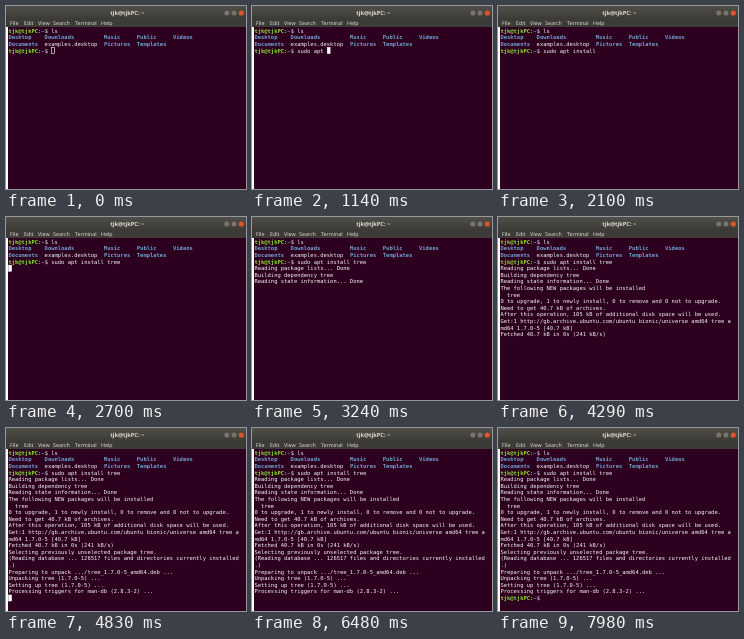
An HTML page for the animation above (8 s loop, 240x183 px).

```html
<!DOCTYPE html>
<html lang="en">
<head>
<meta charset="utf-8">
<title>Terminal</title>
<style>
  html, body { margin: 0; width: 100%; height: 100%; overflow: hidden; background: #2c001e; }
  svg { display: block; width: 240px; height: 183px; }
  text { white-space: pre; text-rendering: geometricPrecision; }
  .ui { font: 5.3px "Noto Sans", sans-serif; fill: #dfdbd2; }
  .title { font-size: 5.7px; font-weight: 700; text-anchor: middle; }
  .term { font: 5.48px "DejaVu Sans Mono", monospace; fill: #f4f4f4; }
  .user { fill: #8ae234; font-weight: 700; }
  .dir { fill: #729fcf; font-weight: 700; }
  #cursor { fill: #fff; stroke: #fff; stroke-width: .6; }
  #cursor.hollow { fill: none; }
</style>
</head>
<body>
<svg viewBox="0 0 240 183">
  <defs>
    <linearGradient id="bar" x2="0" y2="1">
      <stop offset="0" stop-color="#504e48"/>
      <stop offset="1" stop-color="#3d3c37"/>
    </linearGradient>
  </defs>
  <rect width="240" height="183" fill="#2c001e"/>
  <rect width="240" height="12" fill="url(#bar)"/>
  <rect y="12" width="240" height="9" fill="#3c3b37"/>
  <rect y="21" width="2" height="162" fill="#fff"/>
  <text class="ui title" x="121.3" y="8.9">tjk@tjkPC: ~</text>
  <g fill="#77756e">
    <circle cx="220.8" cy="7" r="2.5"/>
    <circle cx="228" cy="7" r="2.5"/>
    <circle cx="235.3" cy="7" r="2.6" fill="#e0542c"/>
  </g>
  <g id="menu" class="ui"></g>
  <g id="rows" class="term"></g>
  <rect id="cursor" width="2.8" height="6"/>
</svg>
<script>
const LOOP = 8000, LEFT = 2.4, TOP = 21.5, COL = 3.3, ROW = 6.6;
const $ = id => document.getElementById(id);
const span = (cls, s) => `<tspan class="${cls}">${s}</tspan>`;
const dir = s => span('dir', s);

const prompt = span('user', 'tjk@tjkPC') + ':' + dir('~') + '$ ';
const promptLength = 13;
const command = 'sudo apt install tree';

const lines = [
  prompt + 'ls',
  dir('Desktop    Downloads         Music     Public     Videos'),
  dir('Documents  ') + 'examples.desktop  ' + dir('Pictures  Templates'),
  prompt,
  'Reading package lists... Done',
  'Building dependency tree',
  'Reading state information... Done',
  'The following NEW packages will be installed',
  '  tree',
  '0 to upgrade, 1 to newly install, 0 to remove and 0 not to upgrade.',
  'Need to get 40.7 kB of archives.',
  'After this operation, 105 kB of additional disk space will be used.',
  'Get:1 http://gb.archive.ubuntu.com/ubuntu bionic/universe amd64 tree a',
  'md64 1.7.0-5 [40.7 kB]',
  'Fetched 40.7 kB in 0s (241 kB/s)',
  'Selecting previously unselected package tree.',
  '(Reading database ... 126517 files and directories currently installed',
  '.)',
  'Preparing to unpack .../tree_1.7.0-5_amd64.deb ...',
  'Unpacking tree (1.7.0-5) ...',
  'Setting up tree (1.7.0-5) ...',
  'Processing triggers for man-db (2.8.3-2) ...',
  prompt
];

// [time, characters typed]
const keys = [
  [0, 0], [690, 1], [750, 2], [840, 4], [900, 5], [960, 6], [1050, 8], [1140, 9],
  [1230, 10], [1320, 12], [1380, 13], [1440, 14], [1560, 16],
  [2190, 17], [2250, 18], [2340, 19], [2400, 20], [2490, 21]
];
// [time, finished lines, unfinished line]
const output = [
  [0, 3, ''], [2640, 4, ''], [2820, 4, 'Reading package lists... 0%'],
  [2850, 4, 'Reading package lists... 98%'], [2880, 5, ''],
  [2910, 5, 'Building dependency tree... 50%'], [3240, 7, ''],
  [3600, 12, '0% [Working]'], [3690, 14, ''], [3750, 14, '100% [Working]'], [3810, 15, ''],
  [4470, 16, ''], [4530, 18, ''], [4560, 20, ''], [4620, 21, ''], [4650, 22, ''],
  [7980, 23, '']
];
const blinks = [630, 690, 2100, 2190, 3240, 3780, 4290, 4830, 5370, 5910, 6480, 6990, 7530];

const latest = (list, t) => list.filter(e => e[0] <= t).pop();

$('menu').innerHTML = [['File', 4], ['Edit', 18], ['View', 32], ['Search', 47], ['Terminal', 69], ['Help', 95]]
  .map(([s, x]) => `<text x="${x}" y="18.5">${s}</text>`).join('');
$('rows').innerHTML = lines
  .map((_, i) => `<text x="${LEFT}" y="${TOP + 5.2 + i * ROW}"></text>`).join('');
const rows = [...$('rows').children];
const cursor = $('cursor');
let shown = '';

function draw(t) {
  const typed = latest(keys, t)[1];
  const [, done, partial] = latest(output, t);
  const typing = done === 3;
  const state = [typed, done, partial].join();

  if (state !== shown) {
    shown = state;
    rows.forEach((row, i) => {
      let s = i < done ? lines[i] : i === done ? partial : '';
      if (i === 3) s = prompt + command.slice(0, typed);
      row.innerHTML = s;
    });
  }

  const col = typing ? promptLength + typed : partial.length;
  cursor.setAttribute('x', LEFT + .3 + col * COL);
  cursor.setAttribute('y', TOP + .3 + done * ROW);
  const off = blinks.filter(b => b <= t).length % 2;
  cursor.style.visibility = off ? 'hidden' : 'visible';
  cursor.classList.toggle('hollow', t < 30);
}

let start;
function tick(now) {
  start ??= now;
  draw((now - start) % LOOP);
  requestAnimationFrame(tick);
}
draw(0);
requestAnimationFrame(tick);
</script>
</body>
</html>
```
